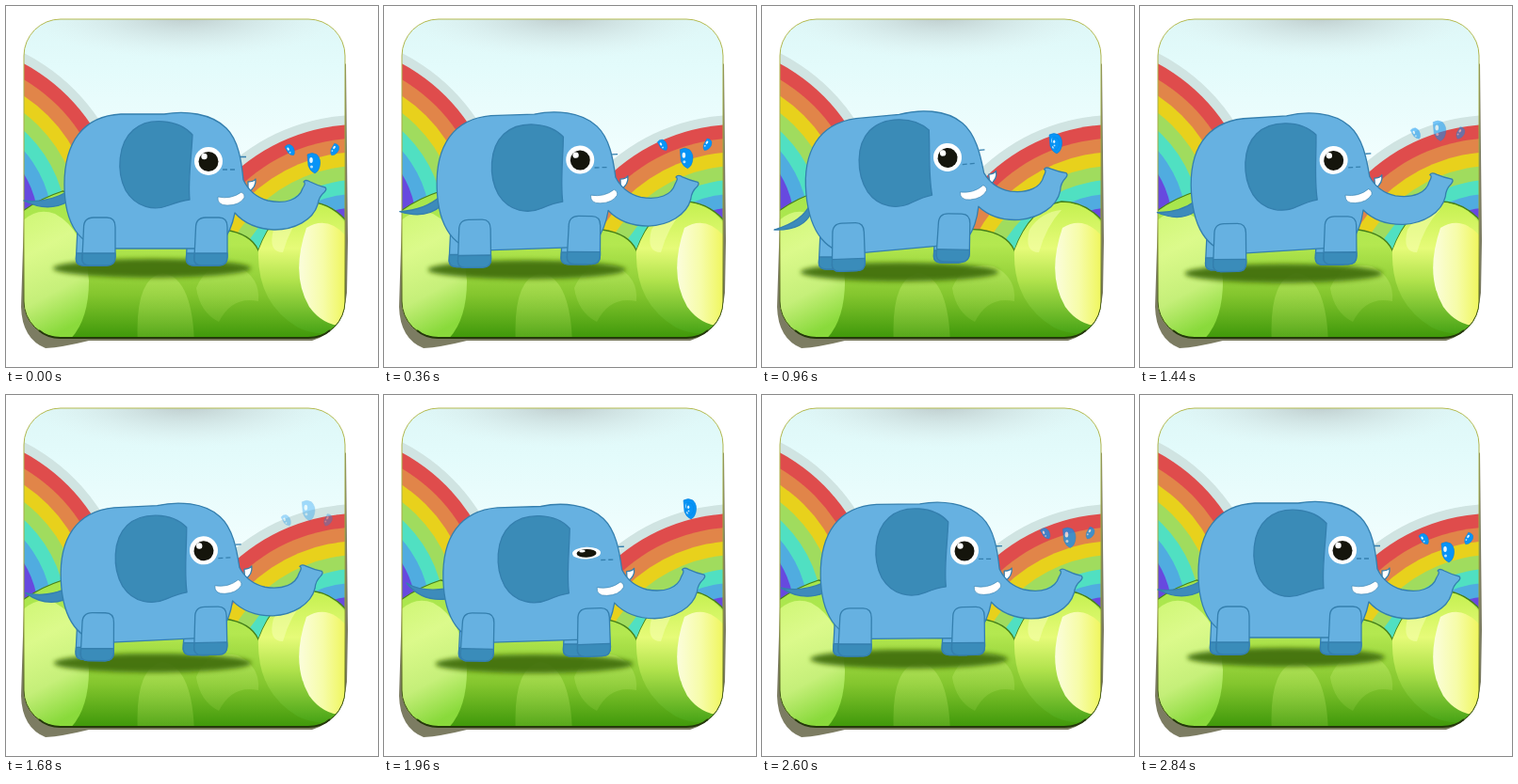
Recreate the animation shown at these times as an HTML page. Size 395 by 384 pixels, loop 2880 ms.

```html
<!DOCTYPE html>
<html lang="en">
<head>
<meta charset="utf-8">
<title>Elephant</title>
<style>
  html, body { margin: 0; width: 100%; height: 100%; overflow: hidden; background: #fff; }
  svg { display: block; width: 100%; height: 100%; }
</style>
</head>
<body>
<svg viewBox="0 0 395 384">
  <defs>
    <clipPath id="card"><rect x="19" y="14" width="341" height="339" rx="39"/></clipPath>
    <linearGradient id="sky" x2="0" y2="1">
      <stop offset="0" stop-color="#def7f7"/><stop offset=".15" stop-color="#e3fbfb"/>
      <stop offset=".45" stop-color="#f2fefe"/>
    </linearGradient>
    <radialGradient id="haze">
      <stop offset="0" stop-color="#bccaca"/><stop offset=".5" stop-color="#cfe0e0" stop-opacity=".6"/>
      <stop offset="1" stop-color="#dff0f0" stop-opacity="0"/>
    </radialGradient>
    <linearGradient id="hill" gradientUnits="userSpaceOnUse" x1="0" y1="200" x2="0" y2="353">
      <stop offset="0" stop-color="#a6e64c"/><stop offset=".35" stop-color="#b4e850"/>
      <stop offset=".7" stop-color="#84c62e"/><stop offset="1" stop-color="#3f980a"/>
    </linearGradient>
    <linearGradient id="leftBush" x2=".3" y2="1">
      <stop offset="0" stop-color="#d2f878"/><stop offset=".35" stop-color="#e0fc92"/>
      <stop offset=".7" stop-color="#cdf482"/><stop offset="1" stop-color="#90e040"/>
    </linearGradient>
    <linearGradient id="lowBush" x2="0" y2="1">
      <stop offset="0" stop-color="#c8f070"/><stop offset="1" stop-color="#a0d850" stop-opacity=".4"/>
    </linearGradient>
    <linearGradient id="rightBush" x2="0" y2="1">
      <stop offset="0" stop-color="#c4f050"/><stop offset=".35" stop-color="#e6fb78"/>
      <stop offset=".6" stop-color="#b0e24c"/><stop offset="1" stop-color="#48a416"/>
    </linearGradient>
    <linearGradient id="shine">
      <stop offset="0" stop-color="#fbfddc"/><stop offset=".5" stop-color="#f6fca8"/>
      <stop offset="1" stop-color="#eff658"/>
    </linearGradient>
    <linearGradient id="edge" x2="0" y2="1">
      <stop offset="0" stop-color="#b4ba50"/><stop offset=".7" stop-color="#8f9c38"/>
      <stop offset="1" stop-color="#24380a"/>
    </linearGradient>
    <filter id="soft" x="-10%" y="-50%" width="120%" height="200%"><feGaussianBlur stdDeviation="2.5"/></filter>
    <g id="legShape">
      <path d="M-16.500 11Q-16.500 0-6 0H8Q17 0 17 10V42Q17 51 8 51H-10Q-19 51-18 42Z"/>
      <path d="M-17.700 38H17V42Q17 51 8 51H-10Q-19 51-18 42Z" fill="#3a8cba"/>
    </g>
    <g id="dropShape">
      <path d="M-7-9Q-2-12 3-9Q8-4 6 4Q5 9 1 11Q-4 9-6 3Z" fill="#0794f7" stroke="#0880d8" stroke-width=".6"/>
      <ellipse cx="-3" cy="-3" rx="1.800" ry="3" fill="#e4f6ff"/>
      <circle cx="-2.500" cy="4" r="1.500" fill="#b8e4ff"/>
    </g>
  </defs>

  <path d="M19 225L16 320Q17 354 42 364Q60 363 88 356H325Q358 346 362 305L363 250L361 62L356 57Z" fill="#7c7c62"/>
  <g clip-path="url(#card)">
    <path d="M19 14H360V353H19Z" fill="url(#sky)"/>
    <ellipse cx="190" cy="10" rx="165" ry="46" fill="url(#haze)"/>
    <g id="rainbows"></g>
    <path d="M10 224Q32 206 60 197Q88 200 110 240Q140 228 180 246Q208 236 232 238Q260 242 268 260Q285 214 318 208Q346 208 366 234V360H10Z"
          fill="url(#hill)" stroke="#47801a" stroke-width="1.300"/>
    <path d="M10 238Q28 212 52 221Q84 238 88 292Q88 340 62 360H10Z" fill="url(#leftBush)" opacity=".9"/>
    <path d="M140 360Q136 290 166 284Q198 288 200 360Z" fill="url(#lowBush)" opacity=".5"/>
    <path d="M202 300Q214 270 246 277Q270 288 268 314Q240 308 226 336Q206 326 202 300Z" fill="url(#lowBush)" opacity=".5"/>
    <path d="M268 260Q285 215 318 209Q346 209 362 233V338Q340 356 310 342Q266 316 268 260Z" fill="url(#rightBush)"/>
    <path d="M319 236Q302 286 322 320Q338 342 362 340V246Q342 222 319 236Z" fill="url(#shine)"/>
    <path d="M284 238Q296 219 318 217Q302 234 294 262Q278 262 284 238Z" fill="#faffb8" opacity=".5"/>
  </g>
  <rect x="19" y="14" width="341" height="339" rx="39" fill="none" stroke="url(#edge)"/>
  <path d="M35 345Q44 353 58 353H321Q335 353 344 345" fill="none" stroke="#24380a" stroke-width="1.800"/>

  <ellipse id="shadow" rx="105" ry="10" fill="#426f10" opacity=".94" filter="url(#soft)"/>
  <g fill="#66b1e1" stroke="#347fae" stroke-width="1.300" stroke-linejoin="round">
    <path id="tail" fill="#3d8bbb"/>
    <use id="hindFar" href="#legShape"/>
    <use id="frontFar" href="#legShape"/>
    <!-- The origin of the body is the centre of the eye. -->
    <g id="body"><g transform="translate(-215 -165)">
      <path d="M257 187Q263 187 265 184Q266 193 257 198Z" fill="#fff"/>
      <path d="M62 190C62 145 82 117 122 115L168 115C190 111 218 114 234 130C247 143 250 165 252 185
               Q260 202 278 207C297 211 311 206 315 194Q319 188 316 187Q318 184 323 187Q331 191 339 193
               Q341 195 338 198Q332 203 331 211C326 228 306 238 285 238Q258 237 243 220
               Q239 240 229 252Q219 259 200 258H112C77 258 62 230 62 190Z"/>
      <path id="ear" d="M198 137C183 120 151 118 135 132C119 146 117 176 127 196C138 215 158 218 173 212Q186 207 195 206C193 184 197 160 198 137Z" fill="#3a8bb7"/>
      <path d="M225 203Q239 206 250 198Q254 200 253 204Q248 212 235 212Q224 212 225 203Z" fill="#fff" stroke-width=".6"/>
      <path d="M249 160.500H255M230 174H235M238 174H243" fill="none"/>
      </g>
      <g id="eye" stroke="none">
        <circle r="15" fill="#fff"/>
        <circle cy=".5" r="10.500" fill="#15150c"/>
        <circle cx="-4.500" cy="-5" r="3.200" fill="#fff"/>
      </g>
    </g>
    <use id="hindNear" href="#legShape"/>
    <use id="frontNear" href="#legShape"/>
  </g>
  <g id="drops">
    <use id="dropLeft" href="#dropShape"/>
    <use id="dropBig" href="#dropShape"/>
    <use id="dropRight" href="#dropShape"/>
  </g>
</svg>
<script>
const LOOP = 2880, STEP = 40;
const LEAN = 960, SINK = 1960, REST = 2840;
const el = id => document.getElementById(id);
const clamp = (v, low = 0, high = 1) => Math.min(high, Math.max(low, v));

// Rises from 0 to 1 at the peak and falls back, both linearly.
const tent = (t, from, peak, to) => clamp(Math.min((t - from) / (peak - from), (to - t) / (to - peak)));

function drawRainbow(cx, cy) {
  const circle = (r, color) => `<circle cx="${cx}" cy="${cy}" r="${r}" fill="${color}"/>`;
  const colors = ['#df4c4c', '#e18549', '#e8d11c', '#a0dc5e', '#50e0c2', '#50ace0', '#6749df', '#f2fdfd'];
  el('rainbows').innerHTML += circle(207, '#d0e4e2') +
    colors.map((color, i) => circle(197 - 14.7 * i, color)).join('');
}
drawRainbow(-74, 235);
drawRainbow(375, 323);

// Resting pose [x, y, rotation], then its change when leaning back and when sinking.
const parts = {
  shadow: [[155, 279, 0], [-9, 4, 0], [4.5, 7, 0]],
  body: [[215, 165, 0], [-18, -4, -5.2], [0, 2, -1.8]],
  hindNear: [[99, 225, 0], [-8, 6, -2], [1, 7, 1]],
  frontNear: [[218, 225, 0], [-14, -4, 1], [4, 2, -2]],
  hindFar: [[92.5, 225, 0], [-14, 4, 0], [5, 6, 0]],
  frontFar: [[209.5, 225, 0], [-9, -3, 0], [-1, 2, 0]]
};
// Base, bend and tip points, in the same three poses.
const tailPoses = [[66, 202, 42, 214, 19, 207], [-14, 12, 0, 19, -6, 31], [0, 9, -4, 0, 5, -7]];
const sprayPoses = [[327, 160], [-15, -14], [-2, -39]];

function place(id, x, y, angle = 0, scale = 1) {
  el(id).setAttribute('transform', `translate(${x} ${y}) rotate(${angle}) scale(${scale})`);
}

function draw(time) {
  const lean = tent(time, 0, LEAN, SINK);
  const sink = tent(time, LEAN, SINK, REST);
  const blend = ([rest, back, low]) => rest.map((v, i) => v + back[i] * lean + low[i] * sink);

  for (const id in parts) place(id, ...blend(parts[id]));
  place('ear', 0, 3 * Math.sin(4 * Math.PI * time / LOOP));
  const lid = clamp(Math.abs(time - 2000) / 95, .1);
  el('eye').setAttribute('transform', `translate(0 ${(1 - lid) * 2}) scale(1 ${lid})`);

  const [bx, by, cx, cy, tx, ty] = blend(tailPoses);
  el('tail').setAttribute('d',
    `M${bx} ${by - 5}Q${cx + 2} ${cy - 4} ${tx} ${ty}Q${cx + 2} ${cy + 6} ${bx} ${by + 6}Z`);

  // The drops meet at both extreme poses and fan out between them.
  const fan = Math.min(1, ...[LEAN, SINK].map(meet => Math.abs(time - meet) / 300));
  const [x, y] = blend(sprayPoses);
  const rise = 7 * fan * (1 - 2.5 * sink);
  place('dropBig', x, y + rise);
  place('dropLeft', x - 25 * fan, y - rise, -25 * fan, .6);
  place('dropRight', x + 22 * fan, y - rise, 35 * fan, .6);
  el('drops').setAttribute('opacity', 1 - sink * fan);
}

const start = performance.now();
function tick() {
  const time = (performance.now() - start) % LOOP;
  draw(Math.floor(time / STEP) * STEP);
  requestAnimationFrame(tick);
}
tick();
</script>
</body>
</html>
```
